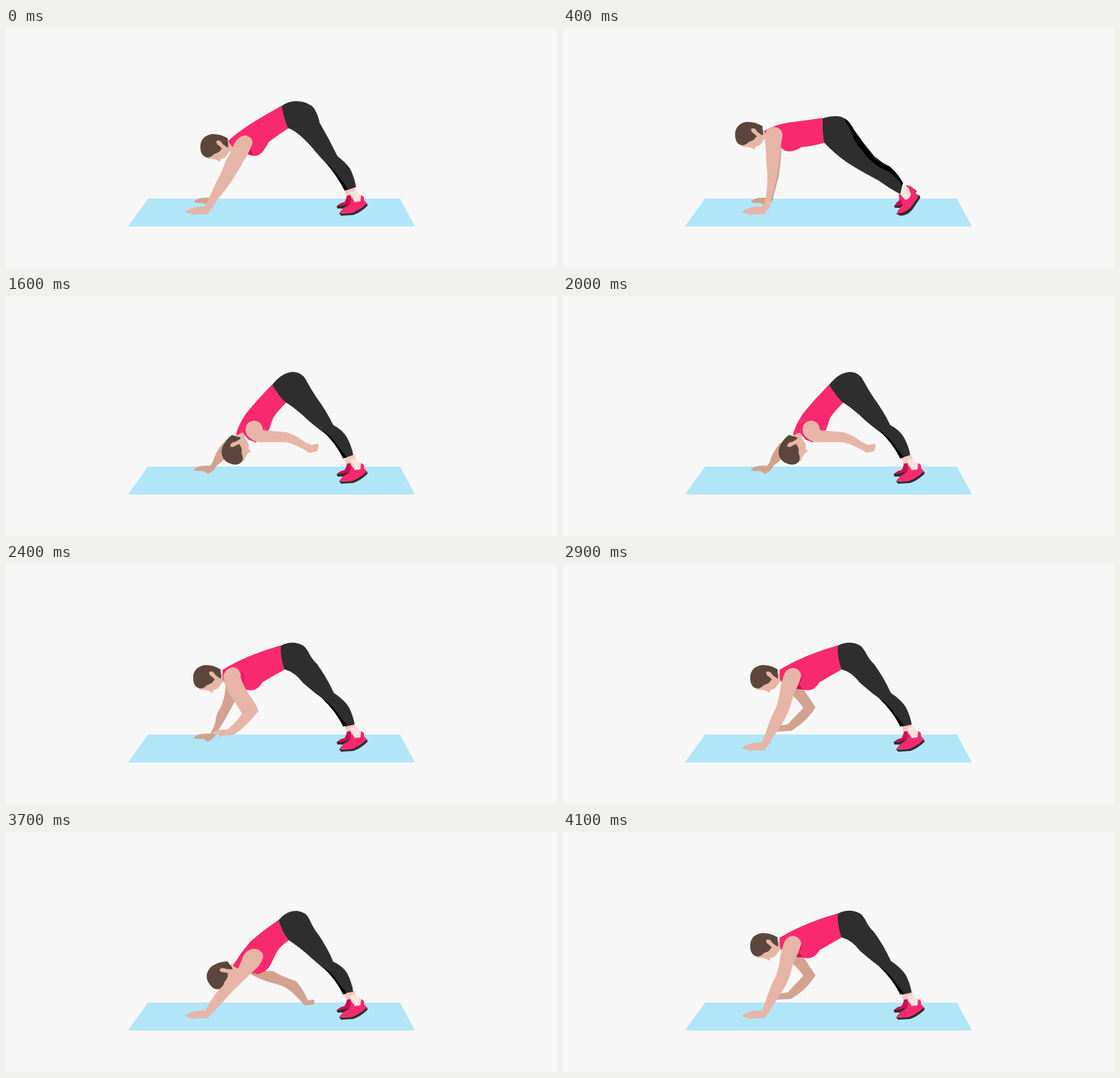
These frames come from a looping animation (768x335 px, 4400 ms). An HTML page:

```html
<!DOCTYPE html>
<html lang="en">
<head>
<meta charset="utf-8">
<title>Plank exercise</title>
<style>
  html, body { margin: 0; width: 100%; height: 100%; overflow: hidden; background: #f7f7f7; }
  svg { display: block; width: 100%; height: 100%; }
  .skin { fill: #e6b5a8; }
  .shade { fill: #d3a28f; }
  .pink { fill: #f9296f; }
  .wine { fill: #c8104f; }
  .dark { fill: #2e2e2e; }
  .black { fill: #000; }
  .hair { fill: #5a463c; }
  .sock { fill: #fde3de; }
  .ankle { fill: #f3c9c0; }
  #torso { stroke: #f9296f; stroke-width: .8; }
</style>
</head>
<body>
<svg viewBox="0 0 768 335">
  <path fill="#b0e6f8" d="M198,238H549L570,277H170Z"/>
  <path class="shade" id="farArm"/>
  <path class="shade" id="farHand" d="M293,233L284,237Q268,236 262,242Q262,245 275,244L281,248Q288,246 293,238Z"/>
  <g id="flat">
    <path class="ankle" d="M471,225L486,222L488,231L475,235Z"/>
    <path class="wine" d="M461,249Q465,244 472,243Q475,238 475,234L482,233L484,244L474,251H462Z"/>
    <path class="dark" d="M461,248Q468,250 477,245L472,252H462Z"/>
    <path class="sock" d="M480,229L488,227L496,236L494,243L488,245L481,239Z"/>
    <path class="pink" d="M465,258Q469,250 478,248Q482,242 481,235Q484,239 486,243L494,242L495,233L499,236V240L504,246L503,249Q492,257 484,260Z"/>
    <path class="dark" d="M464,258Q474,260 483,258Q495,253 503,245L504,248Q494,258 484,261L467,262Z"/>
  </g>
  <g id="toes">
    <path class="wine" d="M462,248Q465,243 469,240L468,232L478,236L473,251L463,251Z"/>
    <path class="dark" d="M461,248Q467,250 472,246V251H463Z"/>
    <path class="dark" d="M482,219L493,228L490,232Z"/>
    <path class="pink" d="M479,219L492,226L490,230L497,234L496,239Q490,247 486,252Q479,260 465,260Q467,252 474,247Q469,239 470,233Z"/>
    <path class="sock" d="M470,232L476,218L482,224L485,232Q483,239 477,240Z"/>
    <path class="dark" d="M464,259Q477,259 485,250L497,233L498,237L488,252Q481,262 470,262Z"/>
  </g>
  <g id="head">
    <path class="skin" d="M14,-6L30,-6L32,6L17,6Z"/>
    <path class="skin" d="M-9,16Q-6,10 0,9Q7,8 8,0L20,-2L22,5Q18,12 15,15L9,17L8,21L3,18Q-3,16 -9,17Z"/>
    <path class="hair" d="M19,-12Q10,-18 -2,-18C-14,-17 -20,-8 -19,1C-19,9 -15,14 -9,15Q-3,14 0,10Q8,8 10,3L20,0Z"/>
    <path class="skin" d="M3,-8Q8,-11 12,-4L20,2L13,5Q9,-1 4,-4Z"/>
  </g>
  <path class="pink" id="torso"/>
  <path class="wine" id="fold"/>
  <path class="dark" id="leg"/>
  <path class="black" id="backLeg"/>
  <path class="skin" id="arm"/>
  <path class="skin" id="hand" d="M283,244L277,249Q262,248 250,256Q249,259 259,259Q256,263 265,260H280L290,248Z"/>
</svg>
<script>
const $ = id => document.getElementById(id);

// Lower bodies: front leg, visible strip of the back leg, stance
const bentStrip = 'M440,187Q454,195 464,211L475,225L470,227Q460,206 440,187Z';
const high = {
  leg: 'M384,109Q393,102 405,102Q423,103 430,113Q436,124 437,132Q450,154 462,179Q473,187 480,197Q486,210 488,222L473,227Q464,210 452,195Q440,183 425,165Q404,142 393,140Q387,126 384,109Z',
  backLeg: 'M445,187Q457,197 467,212L477,225L472,227Q461,206 445,187Z'
};
const mid = {
  leg: 'M383,114Q393,109 403,110Q415,111 421,122Q427,134 433,139Q447,158 457,180Q472,190 478,200Q484,212 486,224L473,227Q462,207 448,193Q431,181 414,166Q403,151 388,147Q382,130 383,114Z',
  backLeg: bentStrip
};
const tilted = {
  leg: 'M380,123Q390,110 405,110Q418,111 423,122Q428,134 436,144Q450,165 456,181Q470,187 476,198Q482,210 484,223L472,225Q460,205 446,193Q430,180 418,169Q405,158 394,151Q385,140 380,123Z',
  backLeg: bentStrip
};
const steep = {
  leg: 'M371,124Q385,106 401,106Q413,107 418,117Q425,130 433,142Q447,161 456,180Q469,187 475,197Q482,210 484,222L472,226Q460,205 446,193Q425,178 412,165Q398,153 389,148Q380,139 371,124Z',
  backLeg: bentStrip
};
const low = {
  leg: 'M362,126Q378,121 388,124Q398,128 405,141Q418,160 434,179Q448,190 462,200Q470,210 474,216L470,232Q455,224 440,213Q410,197 395,187Q378,175 364,160Q361,143 362,126Z',
  backLeg: 'M392,126Q400,130 407,145Q420,165 436,184L455,193Q468,204 474,217L472,219Q461,203 447,197Q433,192 417,171Q405,158 402,145Z',
  toes: true
};

// Upper bodies
const midTop = {
  ...mid, head: [280, 159, 0],
  torso: 'M302,148Q334,128 383,114Q382,130 388,147Q372,156 357,165Q352,175 342,176L325,174L303,162Z',
  fold: 'M328,150Q335,158 330,167L325,174L336,175Q326,170 331,160Z'
};
const tiltedTop = {
  ...tilted, head: [299, 201, -32],
  torso: 'M317,187Q326,170 341,153Q358,138 380,123Q385,140 394,151Q383,158 378,166Q372,177 369,184Q364,195 352,198L340,196L326,192Z'
};
const steepTop = {
  ...steep, head: [319, 216, -68],
  torso: 'M321,194Q323,182 335,164Q350,145 371,124Q380,139 391,148Q376,163 372,170Q368,182 365,190L348,204L338,200L330,190Z'
};

// Planted arms join the fixed hands
const supportArm = 'M307,158Q310,146 320,145Q331,146 332,156Q329,168 322,180Q318,195 314,207Q305,225 294,240L281,260L278,248Q286,225 292,210Q299,200 302,180Q303,170 307,158Z';
const farSupport = 'M306,170Q305,190 298,202Q292,212 292,220Q288,232 284,238L291,240Q306,217 321,188Z';
const steepSupport = 'M326,192L302,206Q292,218 288,232L284,238H292Q302,231 310,222Z';

const poses = {
  start: {
    ...high, head: [290, 166, 0],
    torso: 'M310,158C325,143 350,128 384,109Q387,126 393,140Q380,148 366,159Q360,170 356,174Q351,179 345,178L330,175L316,166Z',
    fold: 'M340,166Q341,174 346,178L336,175Z',
    arm: 'M318,162Q324,150 334,150Q346,153 343,163Q338,176 330,188Q322,202 318,208Q310,222 296,238L281,260L278,248Q287,229 293,215Q300,204 306,186Q313,174 318,162Z'
  },
  lean: { ...midTop, arm: supportArm },
  plank: {
    ...low, head: [259, 149, 0],
    farArm: 'M298,164L305,160Q303,198 300,210L291,244L284,238Z',
    torso: 'M281,144Q296,134 325,131L362,126Q361,143 364,160Q345,165 332,166Q320,174 310,171Q302,168 302,158L286,156Z',
    arm: 'M281,153Q282,139 293,138Q306,139 306,151Q303,164 302,180Q300,196 298,207Q294,225 289,243L281,260V246Q285,226 285,206Q283,186 283,172Z'
  },
  forward: {
    ...low, head: [242, 156, 0],
    leg: 'M349,137Q365,131 378,134Q392,140 402,150Q420,170 436,183Q452,192 466,204Q472,210 474,216L470,232Q453,225 438,215Q410,202 390,191Q370,180 351,170Q348,153 349,137Z',
    backLeg: 'M386,137Q400,146 410,159Q424,174 436,183L455,193Q468,204 474,217L472,219Q461,205 447,199Q426,190 410,169Z',
    farArm: 'M285,165L290,160Q297,180 299,200L292,244L284,238Z',
    torso: 'M263,151Q280,139 308,137H349Q348,153 351,170Q330,172 317,175Q304,180 294,176Q287,172 286,163L269,160Z',
    arm: 'M264,156Q266,142 277,141Q289,143 289,154Q290,175 295,197Q297,220 291,240L281,260V247Q284,225 281,205Q273,185 270,175Q265,165 264,156Z'
  },
  nearLift: {
    ...midTop, free: 'near', farArm: farSupport,
    arm: 'M303,155Q308,144 318,144Q328,147 327,159Q331,170 338,181Q348,194 352,205L342,217Q330,230 318,238L300,240L296,243L297,238Q288,239 287,235Q295,231 309,231Q321,221 329,209Q322,196 313,184Q303,168 303,155Z'
  },
  nearSwing: {
    ...tiltedTop, head: [295, 197, -32], free: 'near',
    farArm: 'M325,186L306,207Q293,218 288,232L284,238H292Q306,228 316,216L338,196Z',
    arm: 'M330,179Q333,164 346,163Q358,166 358,178Q366,190 377,202Q383,214 389,224L398,230Q398,236 388,237L380,234Q371,220 361,211Q347,201 338,192Q331,187 330,179Z'
  },
  nearReach: {
    ...steepTop, free: 'near', farArm: steepSupport,
    arm: 'M334,187Q334,175 346,174Q357,175 358,187Q375,189 390,190Q403,193 415,203L425,208L435,206Q437,211 433,217L423,219Q405,207 390,204H360Q347,205 340,198Q334,194 334,187Z'
  },
  nearTouch: {
    ...steepTop, head: [322, 220, -74], free: 'near', farArm: steepSupport,
    arm: 'M338,192Q338,179 350,178Q361,179 362,191Q385,196 405,200Q425,208 445,216L458,219L470,222Q472,227 467,231L452,229Q425,222 400,213Q380,210 362,208Q338,206 338,192Z'
  },
  farLift: {
    ...midTop, free: 'far', arm: supportArm,
    farArm: 'M318,172L336,176Q344,188 352,200Q345,212 331,224L318,233L300,234Q294,234 294,229Q300,225 313,224Q324,212 335,201Q328,190 318,182Z'
  },
  farSwing: {
    ...mid, head: [289, 180, -15], free: 'far',
    torso: 'M310,168Q333,142 383,114Q382,130 388,147Q372,156 365,168Q360,183 348,186L332,184L316,174Z',
    farArm: 'M333,183L350,183Q363,193 374,205Q381,217 387,226L396,229Q397,235 386,236L378,232Q370,219 359,209Q344,202 333,190Z',
    arm: 'M318,170Q322,156 333,155Q345,156 345,166Q340,180 331,192Q323,207 314,217Q300,236 281,260L278,248Q287,229 295,215Q305,204 311,188Q315,180 318,170Z'
  },
  farReach: {
    ...tiltedTop, free: 'far',
    farArm: 'M340,198Q355,206 368,210Q385,213 397,222L411,236L416,242L429,241L430,234L421,235Q414,219 404,208Q385,202 372,194H355Z',
    arm: 'M329,178Q333,164 346,163Q360,165 358,176Q355,186 345,194Q330,208 315,223Q300,240 281,260L278,249Q288,230 297,220Q310,208 320,196Q326,186 329,178Z'
  },
  farTouch: {
    ...steepTop, head: [308, 211, -48], free: 'far',
    farArm: 'M345,200Q365,210 385,214Q410,222 430,230L450,238H464L466,231L452,229Q425,214 400,206L360,194Z',
    arm: 'M334,188Q335,175 346,174Q358,175 358,187Q354,198 342,204Q322,220 310,230Q298,242 281,260L278,249Q290,234 300,226Q315,212 324,200Z'
  }
};

const loop = 4400;
const steps = [
  [0, 'start'], [200, 'lean'], [400, 'plank'], [600, 'forward'], [1000, 'plank'],
  [1200, 'nearLift'], [1400, 'nearSwing'], [1600, 'nearReach'], [1800, 'nearTouch'],
  [2000, 'nearReach'], [2200, 'nearSwing'], [2400, 'nearLift'], [2600, 'plank'],
  [2900, 'farLift'], [3100, 'farSwing'], [3300, 'farReach'], [3500, 'farTouch'],
  [3700, 'farReach'], [3900, 'farSwing'], [4100, 'farLift']
];

const show = (id, on) => $(id).style.display = on ? '' : 'none';

function draw(name) {
  const pose = poses[name];
  for (const id of ['farArm', 'leg', 'backLeg', 'torso', 'fold', 'arm'])
    $(id).setAttribute('d', pose[id] || '');
  const [x, y, turn] = pose.head;
  $('head').setAttribute('transform', `translate(${x} ${y}) rotate(${turn})`);
  show('hand', pose.free !== 'near');
  show('farHand', pose.free !== 'far');
  show('toes', pose.toes);
  show('flat', !pose.toes);
}

let current;
function tick() {
  const t = performance.now() % loop;
  const name = steps.filter(([at]) => at <= t).pop()[1];
  if (name !== current) draw(current = name);
  requestAnimationFrame(tick);
}
tick();
</script>
</body>
</html>
```
